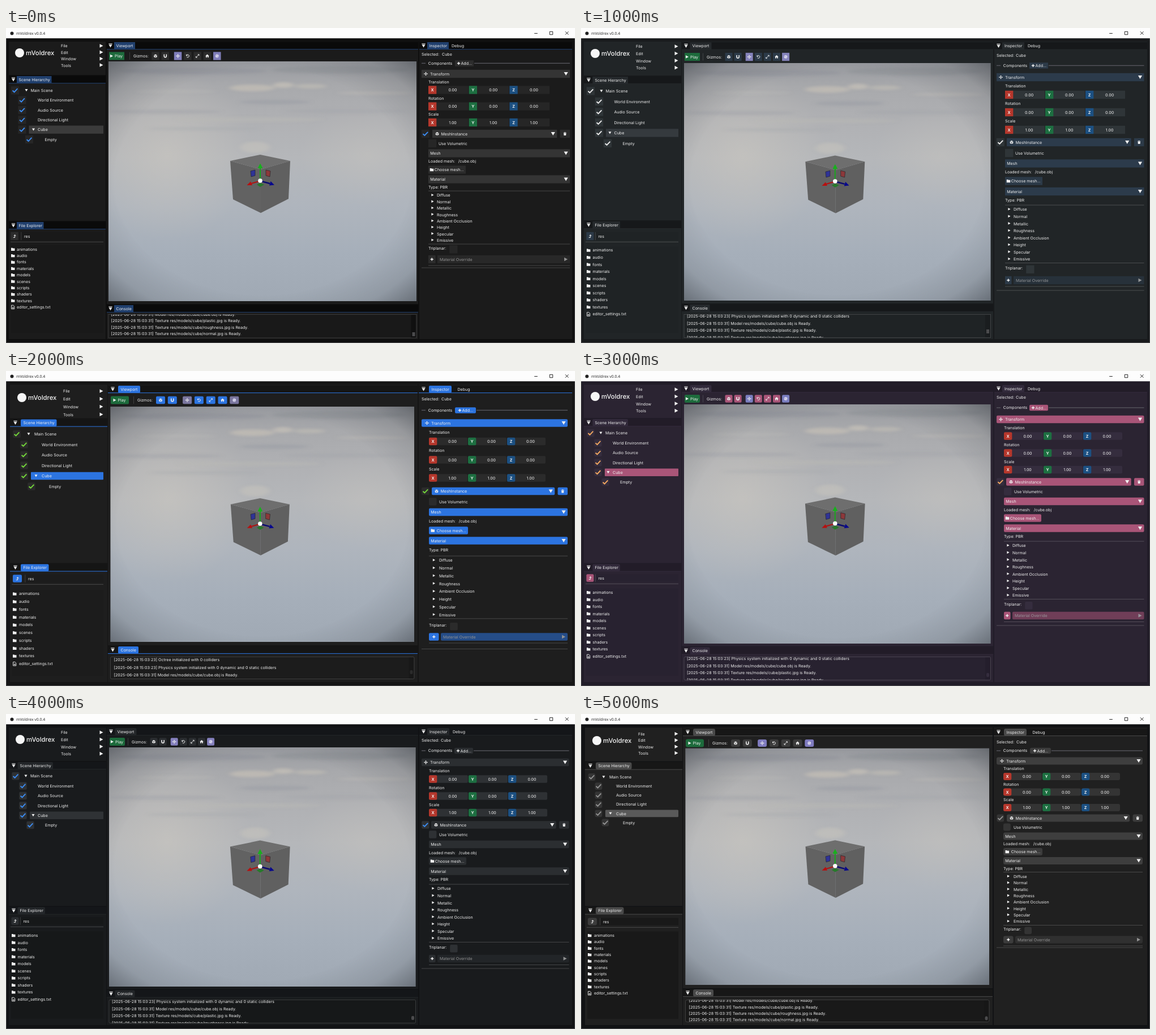
Animation of 1005 by 557 pixels, one loop 6 s. Source, as an HTML page:

```html
<!DOCTYPE html>
<html lang="en">
<head>
<meta charset="utf-8">
<title>Editor themes</title>
<style>
html, body { margin: 0; width: 100%; height: 100%; overflow: hidden; background: #111; }
svg { display: block; }
text { font-family: Inter, "Noto Sans", sans-serif; font-size: 7.05px; white-space: pre; text-rendering: geometricPrecision; }
</style>
</head>
<body>
<svg id="stage" width="1005" height="557" viewBox="0 0 1005 557">
  <defs>
    <linearGradient id="sky" x2="0" y2="1">
      <stop offset="0" stop-color="#989a9f"/><stop offset=".1" stop-color="#a8a9ac"/>
      <stop offset=".25" stop-color="#b0b1b4"/><stop offset=".4" stop-color="#b5b7ba"/>
      <stop offset=".6" stop-color="#afb5bd"/><stop offset=".8" stop-color="#a6afba"/>
      <stop offset="1" stop-color="#a0a9b4"/>
    </linearGradient>
    <radialGradient id="glow"><stop offset="0" stop-color="#c9c6c0" stop-opacity=".65"/><stop offset="1" stop-color="#c9c6c0" stop-opacity="0"/></radialGradient>
    <radialGradient id="shade" r=".72">
      <stop offset=".66" stop-color="#30353b" stop-opacity="0"/>
      <stop offset=".84" stop-color="#30353b" stop-opacity=".14"/>
      <stop offset="1" stop-color="#30353b" stop-opacity=".54"/>
    </radialGradient>
    <filter id="soft" x="-50%" y="-100%" width="200%" height="300%"><feGaussianBlur stdDeviation="5 2"/></filter>
  </defs>
  <g id="ui"></g>
</svg>
<script>
const APP = 'mVoldrex';
const WHITE = '#f1f1f1';
const LINE = 'rgba(255,255,255,.19)';

// Shared horizontal metrics for the three spacing styles
const tight = {
  left: 176, mid: [178, 728], right: 730, logo: 16, menuX: 97, tri: 13, tab: 22.5, tabPad: 3.5,
  icon: 9, name: 19, up: 15, res: 32, vTri: 184.5, vTab: 194.5, play: [182, 27], giz: 225,
  tools: [264, 17.3, 5], toolW: 13.5, logX: 185.5, iTab: 747.5, debug: 787, cube: 770,
  add: [793, 33], end: 996, headX: 749, ind: 15, ov: 16
};
const normal = {
  ...tight, left: 177, logo: 17, tri: 13.5, tab: 24.5, tabPad: 4, icon: 10, name: 20.5, up: 16,
  res: 30.5, vTri: 185.5, vTab: 196.5, play: [183, 27], giz: 222, tools: [261, 16.1, 4], toolW: 13,
  logX: 187, iTab: 748, debug: 789, cube: 768, add: [792, 33], end: 994.5, ov: 15
};
const wide = {
  ...tight, left: 179, mid: [180, 727], right: 729, logo: 20, menuX: 101, tri: 16.5, tab: 30.5, tabPad: 4.5,
  icon: 12, name: 23, up: 20, res: 39, vTri: 188.5, vTab: 202.5, play: [185, 32], giz: 232,
  tools: [273, 20.8, 5.5], toolW: 16, logX: 190.5, iTab: 751.5, debug: 797.5, cube: 769,
  add: [793, 37], end: 992, headX: 751, ind: 18, ov: 21
};

// tree: check, arrow, text, indent, top, step; log: tab, box top, box bottom, first line, thumb
// ys: vertical centres of the inspector rows from top to bottom
const midnight = {
  ...normal, bg: '#111214', win: '#191b1d', bar: '#141619', tabFill: '#232629', head: '#2b2e31', btn: '#2b2e31',
  frame: '#2e3134', check: '#3b8bf2', sel: '#2f3235', tool: '#8480bd', child: '#161819',
  r: 2, h: 13.4, s: 12.55, logoY: 45, menuY: 33, tabs: [31, 91, 347.5], tree: [17, 35, 43, 13, 109.8, 17.35],
  upY: 366, filesY: 391.5, toolY: 49, view: [182, 59, 541.5, 423], log: [494.5, 505.5, 546.5, 496.2, 534],
  lab: 747, axis: 70, inst: 751,
  ys: [47, 65, 85.5, 100.5, 115, 130.5, 145, 160.5, 174.5, 196, 213, 230.5, 245.5, 260, 278, 293, 309, 413, 432.5, 450]
};
const themes = [
  {
    ...tight, bg: '#0f0f0f', win: '#1b1b1b', bar: '#0a0a0a', tabFill: '#203f6d', head: '#343434', btn: '#2c2c2c',
    frame: '#262626', check: '#3b8bf2', sel: '#3b3b3b', tool: '#7f7db9', child: '#191919',
    r: 0, h: 14.3, s: 11.35, logoY: 44, menuY: 32, tabs: [31, 91, 349], tree: [16, 36, 43.5, 12.5, 110.3, 17.35],
    upY: 368, filesY: 391.3, toolY: 49.5, view: [181, 59, 544, 424], log: [496, 506.5, 548, 483.8, 538],
    lab: 746, axis: 71.7, inst: 753,
    ys: [47, 62.5, 81, 95.5, 109.5, 124.5, 138.5, 153, 167, 187, 204, 221.5, 236, 250.5, 267.5, 282, 296, 389.5, 409, 424]
  },
  {
    ...normal, bg: '#181a1c', win: '#212527', bar: '#16181a', tabFill: '#25292c', head: '#2c3b4b', btn: '#2c3a48',
    frame: '#2f3538', check: '#ececec', sel: '#353a3e', tool: '#8583bb', child: '#1f2325',
    r: 0, h: 14.3, s: 12.55, logoY: 45, menuY: 33, tabs: [31.5, 92, 348], tree: [17, 36, 43.5, 15, 111.5, 18.5],
    upY: 368, filesY: 393, toolY: 51, view: [182, 62, 541.5, 420], log: [495, 506.5, 547.5, 497.2, 533],
    lab: 749, axis: 71, inst: 752,
    ys: [48.5, 66.5, 87, 103, 118, 134, 149, 165, 180, 202, 221, 239.5, 255, 270.5, 289, 305, 321, 425, 446, 464]
  },
  {
    ...wide, bg: '#151515', win: '#1e1e1e', bar: '#151515', tabFill: '#2c74e0', head: '#2c74e0', btn: '#2c74e0',
    frame: '#2b2b2b', check: '#74d83a', sel: '#2c74e0', tool: '#7a769e', child: '#1c1c1c',
    r: 2, h: 13.6, s: 13.75, logoY: 47, menuY: 36, tabs: [32, 91.5, 347.5], tree: [19, 40, 50, 13, 111.5, 18.5],
    upY: 367, filesY: 394, toolY: 51.5, view: [184.5, 63, 536.5, 416], log: [493, 505.5, 544.5, 510.5, 529],
    lab: 747, axis: 69, inst: 752,
    ys: [49.5, 69.5, 92, 109, 124.5, 141, 157, 173.5, 189, 212.5, 231, 249.5, 266, 282, 300, 317, 335, 450, 470, 491.5]
  },
  {
    ...midnight, bg: '#211c28', win: '#2b2432', bar: '#221c28', tabFill: '#322a3b', head: '#a95578', btn: '#a95578',
    frame: '#352d3e', check: '#f5a860', sel: '#a95578', tool: '#7b7fc0', child: '#282230'
  },
  midnight,
  {
    ...wide, bg: '#111214', win: '#202020', bar: '#171717', tabFill: '#4a4a4a', head: '#3e3e3e', btn: '#3c3c3c',
    frame: '#343434', check: '#929292', sel: '#595959', tool: '#7f7bbf', child: '#191919',
    r: 3, h: 12.8, s: 11.35, logoY: 47, menuY: 35.5, tabs: [32, 91.5, 347.5], tree: [19, 40, 50, 12, 111.5, 16.1],
    upY: 367, filesY: 391.5, toolY: 51.5, view: [184.5, 60.5, 536.5, 418.5], log: [493, 505.5, 544.5, 484, 534.5],
    lab: 746, axis: 69, inst: 752,
    ys: [49.5, 65, 83, 97, 110.5, 124.5, 138, 152, 165.5, 184, 200, 216, 230, 243.5, 259.5, 273.5, 287.5, 381, 399, 413]
  }
];

const rect = (x, y, w, h, fill, r = 0, more = '') =>
  `<rect x="${x}" y="${y}" width="${w}" height="${h}" rx="${r}" fill="${fill}" ${more}/>`;
const box = (x, mid, w, h, fill, r) => rect(x, mid - h / 2, w, h, fill, r);
const label = (x, mid, str, more = '') => `<text x="${x}" y="${mid + 2.45}" fill="${WHITE}" ${more}>${str}</text>`;
const path = (x, y, d, more = `fill="${WHITE}"`) => `<path transform="translate(${x} ${y})" d="${d}" ${more}/>`;
const stroke = (color, w) => `fill="none" stroke="${color}" stroke-width="${w}"`;
const hline = (x1, x2, y, color = LINE) => rect(x1, y - .5, x2 - x1, 1, color);
const down = (x, y, k = 1) => path(x, y, `M${-3.6 * k} ${-2.8 * k}h${7.2 * k}L0 ${3.2 * k}Z`);
const side = (x, y, k = 1, fill = WHITE) => path(x, y, `M${-3 * k} ${-3.3 * k}v${6.6 * k}L${3 * k} 0Z`, `fill="${fill}"`);
const plus = (x, y, k = 2.6) => path(x, y, `M${-k} 0h${2 * k}M0 ${-k}v${2 * k}`, stroke(WHITE, 1.5));
const folder = (x, y) => path(x, y, 'M0-2.6h2.4l.9.9h3.2v4.4H0Z');
const move = (x, y) => path(x, y, 'M-3 0H3M0-3V3M-2-1l-1 1 1 1M2-1l1 1-1 1M-1-2l1-1 1 1M-1 2l1 1 1-1', stroke(WHITE, .9));
const cubeIcon = (x, y) => path(x, y, 'M0-3 2.8-1.6 0-.2-2.8-1.6ZM-2.8-.9-.3.4V3.1L-2.8 1.8ZM2.8-.9.3.4V3.1L2.8 1.8Z');
const many = (list, fn) => list.map(fn).join('');

const toolIcons = [
  cubeIcon,
  (x, y) => path(x, y, 'M-2-3V.2a2 2 0 0 0 4 0V-3', stroke(WHITE, 1.6)),
  move,
  (x, y) => path(x, y, 'M-2.4-2.6v2h2M-2.2-.9A2.4 2.4 0 1 1-1.6 1.8', stroke(WHITE, 1)),
  (x, y) => path(x, y, 'M-2.6 2.6 2.6-2.6M-2.7.5v2.2h2.2M.5-2.7h2.2v2.2', stroke(WHITE, .9)),
  (x, y) => path(x, y, 'M-3.3.1 0-3 3.3.1H2.4V2.8H.7V.8H-.7V2.8H-2.4V.1Z'),
  (x, y) => `<circle cx="${x}" cy="${y}" r="2.9" fill="#dedcf0"/>` + path(x, y, 'M-2.5-.6Q0 .8 1-2.6M-.6 2.6Q0 .6 2.5.6', stroke('#9794c4', .7))
];

const checkBox = (t, x, y) => box(x - t.h / 2, y, t.h, t.h, t.frame, t.r) +
  path(x, y, 'M-4.4.2-1.4 3 4.4-3.2', stroke(t.check, 1.9));

function tabStrip(t, x1, x2, y, triX, textX, name, w) {
  return rect(x1, y - 6.5, x2 - x1, 13, t.bar) +
    rect(textX - t.tabPad, y - 6, w + 2 * t.tabPad, 12.5, t.tabFill, t.r) +
    hline(x1, x2, y + 6.6, t.tabFill) + rect(triX - 3.2, y - 3.7, 6.4, 1, WHITE) +
    down(triX, y + .7, .85) + label(textX, y + .2, name);
}

function titleBar() {
  return rect(0, 0, 1005, 18.2, '#fdfdfd') + '<circle cx="10.5" cy="9.5" r="3" fill="#222"/>' +
    `<text x="18" y="12" style="font-family:'Open Sans',sans-serif;font-size:6.9px" fill="#1c1c1c">${APP} v0.0.4</text>` +
    path(936, 9.5, 'M-2.8 0H2.8', stroke('#111', .9)) +
    path(963, 9, 'M-2.7-2.7H2.7V2.7H-2.7Z', stroke('#111', .9)) +
    path(990.7, 9, 'M-2.8-2.8 2.8 2.8M2.8-2.8-2.8 2.8', stroke('#111', .9));
}

function leftPanels(t) {
  const [menuTop, sceneY, filesTab] = [24, t.tabs[1], t.tabs[2]];
  const [check, arrow, textX, ind, top, step] = t.tree;
  const x = t.up === 20 ? 7 : 5, w = t.left - x;
  const rows = [['Main Scene', 0], ['World Environment', 1], ['Audio Source', 1], ['Directional Light', 1], ['Cube', 1], ['Empty', 2]];
  const files = ['animations', 'audio', 'fonts', 'materials', 'models', 'scenes', 'scripts', 'shaders', 'textures', 'editor_settings.txt'];
  const selX = check + ind + 12, selY = top + 4 * step;

  return rect(x, menuTop, w, sceneY - 8 - menuTop, t.win) +
    rect(x, sceneY, w, filesTab - 8 - sceneY, t.win) + rect(x, filesTab, w, 550 - filesTab, t.win) +
    `<circle cx="${t.logo + 8}" cy="${t.logoY}" r="8" fill="#f6f6f6"/>` +
    `<text x="${t.logo + 19}" y="${t.logoY + 3.8}" fill="#f6f6f6" style="font-size:11.3px;font-weight:500">${APP}</text>` +
    many(['File', 'Edit', 'Window', 'Tools'], (s, i) => label(t.menuX, t.menuY + i * t.s, s) + side(168.5, t.menuY + i * t.s - .5)) +
    tabStrip(t, x, t.left, sceneY, t.tri, t.tab, 'Scene Hierarchy', 54.5) +
    box(selX, selY, 172 - selX, t.h, t.sel, t.r / 2) +
    many(rows, ([s, d], i) => {
      const y = top + i * step;
      return checkBox(t, check + d * ind, y) + label(textX + d * ind, y + .2, s) +
        (i % 4 ? '' : down(arrow + d * ind, y - .3, .7));
    }) +
    tabStrip(t, x, t.left, filesTab, t.tri, t.tab, 'File Explorer', 40.5) +
    box(t.up - t.toolW / 2, t.upY, t.toolW, t.h, t.btn, t.r) +
    path(t.up, t.upY, 'M-2.2 2.4H.6V-2M-1.2-.4.6-2.4 2.4-.4', stroke(WHITE, 1)) +
    box(t.res - 5, t.upY, 177 - t.res, t.h, t.child) + rect(t.res - 5.5, t.upY - t.h / 2, .8, t.h, LINE) +
    label(t.res, t.upY + .2, 'res') + hline(x + 3, 172, t.upY + 10.3) +
    rect(x + 4, t.filesY - 7, 168 - x, 546 - t.filesY, t.child) +
    many(files, (s, i) => {
      const y = t.filesY + i * t.s;
      return label(t.name, y, s) + (i < 9 ? folder(t.icon, y) :
        path(t.icon + .6, y, 'M0-3.2h3.3l1.9 1.9v4.7H0ZM1.2.4h2.8M1.2 1.9h2.8', stroke(WHITE, .9)));
    });
}

// Sky, cube and gizmo, drawn around a fixed centre and scaled with the view height
function scene(cx, cy, k) {
  const puff = (x, y, rx, ry, c, o) => `<ellipse cx="${x}" cy="${y}" rx="${rx}" ry="${ry}" fill="${c}" opacity="${o}"/>`;
  const poly = (pts, c, more = '') => `<polygon points="${pts}" fill="${c}" ${more}/>`;
  const edge = 'stroke="#1c1c22" stroke-width=".6"';
  return `<g transform="translate(${cx} ${cy}) scale(${k}) translate(-453 -271)">` +
    rect(178, 59, 550, 424, 'url(#sky)') +
    '<ellipse cx="285" cy="225" rx="150" ry="150" fill="url(#glow)"/><ellipse cx="640" cy="225" rx="120" ry="90" fill="url(#glow)" opacity=".6"/>' +
    '<g filter="url(#soft)">' +
    puff(330, 76, 130, 6, '#878b93', .35) + puff(590, 74, 120, 7, '#858990', .4) +
    puff(435, 106, 40, 6, '#c6c1b7', .65) + puff(490, 101, 18, 5, '#c9c4ba', .65) + puff(538, 103, 28, 4, '#c2beb6', .6) +
    puff(650, 115, 65, 3, '#bcbab6', .5) + puff(300, 112, 70, 3, '#b9b8b7', .4) +
    puff(475, 131, 62, 4, '#999da5', .55) + puff(280, 148, 100, 4, '#a0a3a9', .45) + puff(600, 147, 110, 4, '#a2a5ab', .4) +
    puff(430, 162, 130, 4, '#bab9b6', .5) + puff(350, 178, 100, 3, '#a9abaf', .45) + puff(440, 211, 26, 10, '#c5c3bc', .6) + '</g>' +
    rect(178, 59, 550, 424, 'url(#shade)') +
    poly('396,235 449,224 502,235 450,250', '#6e6e6e') +
    poly('396,235 450,250 450,327 401,303', '#626262') +
    poly('502,235 450,250 450,327 499,302', '#606060') +
    poly('432,253 440,251 440,261 433,263', '#2f3396', edge) + poly('459,251 467,253 466,263 459,261', '#8c383a', edge) +
    poly('443,277 449,274 456,277 449,281', '#267a2a') +
    '<path d="M449 268V247" stroke="#18a51d" stroke-width="2"/>' + poly('444.5,248 449,239.5 453.5,248', '#18b01d') +
    '<path d="M447 271 433 275" stroke="#b01212" stroke-width="2"/>' + poly('425.5,278 432,271.5 435,278', '#b80f0f') +
    '<path d="M451 271 466 275" stroke="#0a0a70" stroke-width="2.4"/>' + poly('474,277.5 467.5,271 465,278.5', '#08088c') +
    '<circle cx="449" cy="270" r="3.8" fill="#fff"/></g>';
}

function centrePanels(t) {
  const [x1, x2] = t.mid, [vx, vy, vw, vh] = t.view, [logTab, logTop, logEnd, logY, thumb] = t.log;
  const [toolX, toolStep, gap] = t.tools, [px, pw] = t.play;
  const textures = many(['plastic', 'roughness', 'normal'], s => `|31] Texture res/models/cube/${s}.jpg is Ready.`);
  const log = ('23] Octree initialized with 0 colliders|23] Physics system initialized with 0 dynamic and 0 static colliders' +
    '|31] Model res/models/cube/cube.obj is Ready.' + textures).split('|');

  return rect(x1, 24, x2 - x1, logTab - 32, t.win) + rect(x1, logTab, x2 - x1, 550 - logTab, t.win) +
    tabStrip(t, x1, x2, t.tabs[0], t.vTri, t.vTab, 'Viewport', 30) +
    box(px, t.toolY, pw, 14, '#1d6b3c', t.r) + side(px + pw / 2 - 9, t.toolY, .85) + label(px + pw / 2 - 3.5, t.toolY + .4, 'Play') +
    rect(t.giz - 7, t.toolY - 6.5, .8, 13, LINE) + label(t.giz, t.toolY + .4, 'Gizmos:') +
    many(toolIcons, (icon, i) => {
      const x = toolX + i * toolStep + (i > 1 ? gap : 0);
      return box(x - t.toolW / 2, t.toolY, t.toolW, t.h, i === 2 || i === 6 ? t.tool : t.btn, t.r) + icon(x, t.toolY);
    }) +
    `<svg x="${vx}" y="${vy}" width="${vw}" height="${vh}">${scene(vw / 2, vh / 2, vh / 424)}</svg>` +
    tabStrip(t, x1, x2, logTab, t.vTri, t.vTab, 'Console', 27) +
    rect(vx, logTop, vw, logEnd - logTop, t.child, t.r, `stroke="${LINE}" stroke-width=".8"`) +
    `<svg x="${vx}" y="${logTop}" width="${vw}" height="${logEnd - logTop}">` +
    many(log, (s, i) => label(t.logX - vx, logY + i * t.s - logTop, `[2025-06-28 15:03:${s}`)) + '</svg>' +
    rect(vx + vw - 9.5, logTop + .5, 8.5, logEnd - logTop - 1, t.bar, 0, 'opacity=".55"') +
    rect(vx + vw - 7.5, thumb, 5, 7, t.head === t.sel ? t.frame : '#4b4b4d', t.r);
}

function inspector(t) {
  const { lab, end, ind, h, r, ov } = t;
  const [sel, comp, trans, tLab, tRow, rLab, rRow, sLab, sRow, inst, vol, mesh, loaded, choose, mat, type, list, tri, over, last] = t.ys;
  const [ax, aw] = t.add;
  const maps = ['Diffuse', 'Normal', 'Metallic', 'Roughness', 'Ambient Occlusion', 'Height', 'Specular', 'Emissive'];
  const header = (x, x2, y, s, textX) => box(x, y, x2 - x, h, t.head, r) + label(textX, y + .2, s) + down(x2 - 7, y - .3);
  const vector = (s, y, rowY, value) => label(lab, y, s) + many(['X', 'Y', 'Z'], (a, i) => {
    const x = lab + i * t.axis;
    return box(x, rowY, t.axis - 1, h, t.frame, r) + box(x, rowY, 14.3, h, ['#b5372c', '#1d6f41', '#1c5082'][i], r) +
      label(x + 7.2, rowY + .2, a, 'text-anchor="middle" font-weight="700"') +
      label(x + t.axis * .6, rowY + .2, value, 'text-anchor="middle"');
  });

  return rect(t.right, 24, 1000 - t.right, 526, t.win) +
    tabStrip(t, t.right, 1000, t.tabs[0], 737.5, t.iTab, 'Inspector', 31) + label(t.debug, t.tabs[0] + .2, 'Debug') +
    label(734, sel, 'Selected:') + label(t.cube, sel, 'Cube') +
    rect(734, comp - .8, 7, 1.4, '#55555c') + label(745.8, comp, 'Components') +
    box(ax, comp, aw, 10.5, t.btn, r) + plus(ax + aw / 2 - 10, comp) + label(ax + aw / 2 - 6, comp + .2, 'Add...') +
    rect(ax + aw + 1, comp - .8, end - ax - aw - 1, 1.4, '#55555c') +
    header(734, end, trans, 'Transform', t.headX) + move(t.headX - 7.5, trans) +
    vector('Translation', tLab, tRow, '0.00') + vector('Rotation', rLab, rRow, '0.00') + vector('Scale', sLab, sRow, '1.00') +
    checkBox(t, 740.8, inst) + header(t.inst, end - 22.8, inst, 'MeshInstance', t.inst + 15.5) + cubeIcon(t.inst + 8.5, inst) +
    box(end - 17.5, inst, 17.5, h, t.btn, r) + path(end - 8.8, inst, 'M-2.6-2.3h1.6l.3-.7h1.4l.3.7h1.6v.8h-5.2ZM-2.2-1h4.4l-.3 4h-3.8Z') +
    box(lab, vol, h, h, t.frame, r) + label(lab + 18, vol + .2, 'Use Volumetric') +
    header(lab, end, mesh, 'Mesh', lab + 3.2) +
    label(lab, loaded, 'Loaded mesh:') + label(lab + 52.7, loaded, '/cube.obj') +
    box(lab, choose, 51 + ind, h, t.btn, r) + folder(lab + ind / 4 - 1, choose) + label(lab + ind - 4.2, choose + .2, 'Choose mesh...') +
    header(lab, end, mat, 'Material', lab + 3.2) + label(lab, type, 'Type: PBR') + hline(lab, end, list - 7.9) +
    many(maps, (s, i) => side(lab + ind / 2, list + i * t.s - .7, .7) + label(lab + ind, list + i * t.s, s)) +
    hline(lab, end, list + 7 * t.s + 6.6) + label(lab, tri, 'Triplanar:') + box(lab + 37.2, tri + 1.8, h, h, t.frame, r) +
    box(lab, over, ov - 3.5, h, t.btn, r) + plus(lab + (ov - 3.5) / 2, over) +
    `<g opacity=".55">${box(lab + ov, over, end - lab - ov, h, t.head, r)}${label(lab + ov + 4, over + .2, 'Material Override')}${side(end - 7, over)}</g>` +
    hline(lab, end, over + 11) + hline(734, end, last);
}

const ui = document.getElementById('ui');
let shown = -1;

function draw(now) {
  const i = Math.floor(now / 1000) % themes.length;
  if (i === shown) return;
  const t = themes[i];
  ui.innerHTML = rect(0, 0, 1005, 557, t.bg) + leftPanels(t) + centrePanels(t) + inspector(t) +
    rect(.5, .5, 1004, 556, 'none', 0, 'stroke="#4a4a4c"') + titleBar();
  shown = i;
}

function tick() {
  draw(performance.now());
  requestAnimationFrame(tick);
}
tick();
</script>
</body>
</html>
```
